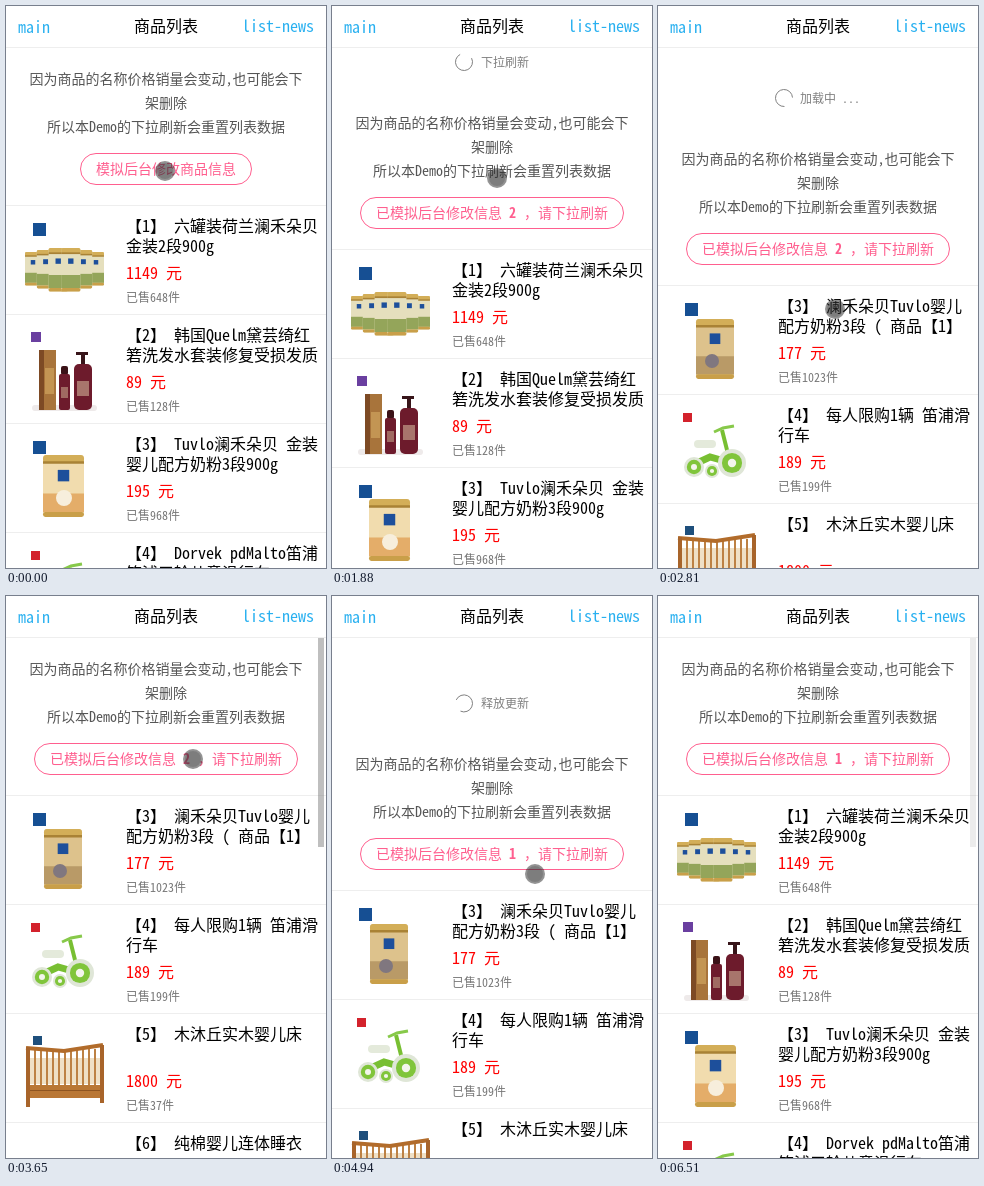
An HTML page with a canvas that plays this animation: 320 by 562 pixels, repeating every 6610 ms.

```html
<!DOCTYPE html>
<html lang="zh-CN">
<head>
<meta charset="utf-8">
<title>商品列表</title>
<style>
  html, body { margin: 0; width: 100%; height: 100%; overflow: hidden; background: #fff; }
  canvas { display: block; width: 320px; height: 562px; }
</style>
</head>
<body>
<canvas id="stage" width="320" height="562"></canvas>
<script>
const ctx = document.getElementById('stage').getContext('2d');
const LOOP = 6610, WIDTH = 320, HEIGHT = 562, ROW = 109, REFRESH = 80;
const FAMILY = '"Noto Sans Mono CJK SC", "Noto Sans CJK SC", "Noto Sans CJK", monospace';

// The screen repaints only at these moments.
const MOMENTS = [0, 1240, 1360, 1480, 1630, 1760, 1880, 2030, 2150, 2270, 2420, 2540,
  2690, 2810, 2960, 3110, 3230, 3380, 3510, 3650, 3770, 3890, 4010, 4160, 4280, 4430,
  4580, 4700, 4820, 4940, 5090, 5240, 5360, 5510, 5660, 5780, 5930, 6360, 6510];

// Finger track: time, x, y
const TRACK = [[0, 159, 165], [1239, 159, 165], [1240, 160, 163], [1480, 163, 124],
  [1630, 164, 131], [1760, 164, 146], [1880, 165, 172], [2030, 167, 222],
  [2270, 169, 318], [2540, 173, 318], [2810, 177, 303], [3230, 184, 204],
  [3510, 188, 171], [3650, 187, 163], [3890, 187, 161], [4010, 186, 143],
  [4160, 186, 101], [4430, 187, 129], [4580, 188, 181], [4700, 191, 206],
  [4940, 203, 278], [5090, 226, 400], [5240, 244, 490], [5510, 252, 517],
  [5660, 258, 548], [5780, 262, 590]];

// Each pull: first touch, finger start, release, collapse
const PULLS = [
  { from: 1600, startY: 128, release: 2290, collapse: 2935 },
  { from: 4400, startY: 121, release: 5095, collapse: 5635 }
];
const SETTLE = 300;

const STOCK = [
  { title: ['【1】 六罐装荷兰澜禾朵贝', '金装2段900g'], price: 1149, sold: 648, art: sixTins },
  { title: ['【2】 韩国Quelm黛芸绮红', '箬洗发水套装修复受损发质'], price: 89, sold: 128, art: shampoo },
  { title: ['【3】 Tuvlo澜禾朵贝 金装', '婴儿配方奶粉3段900g'], price: 195, sold: 968, art: creamTin },
  { title: ['【4】 Dorvek pdMalto笛浦', '笛浦三轮儿童滑行车'], price: 389, sold: 85, art: trike }
];
const UPDATED = [
  { title: ['【3】 澜禾朵贝Tuvlo婴儿', '配方奶粉3段 ( 商品【1】'], price: 177, sold: 1023, art: goldTin },
  { title: ['【4】 每人限购1辆 笛浦滑', '行车'], price: 189, sold: 199, art: trike },
  { title: ['【5】 木沐丘实木婴儿床'], price: 1800, sold: 37, art: crib },
  { title: ['【6】 纯棉婴儿连体睡衣'], price: 69, sold: 240, art: () => {} }
];

const clamp = v => Math.max(0, Math.min(1, v));

// CSS "ease": cubic-bezier(.25, .1, .25, 1)
function ease(x) {
  if (x <= 0 || x >= 1) return clamp(x);
  const bezier = (s, a, b) => 3 * a * s * (1 - s) ** 2 + 3 * b * s * s * (1 - s) + s ** 3;
  let low = 0, high = 1;
  for (let i = 0; i < 16; i++) {
    const mid = (low + high) / 2;
    if (bezier(mid, 0.25, 0.25) < x) low = mid; else high = mid;
  }
  return bezier(low, 0.1, 1);
}

function fingerAt(t) {
  const next = TRACK.findIndex(key => key[0] > t);
  if (next < 0) return null;
  const [t0, x0, y0] = TRACK[next - 1], [t1, x1, y1] = TRACK[next];
  const k = (t - t0) / (t1 - t0);
  return { x: x0 + (x1 - x0) * k, y: y0 + (y1 - y0) * k };
}

// Beyond the refresh height the list follows the finger at a fifth of its speed.
function dragHeight(t, startY) {
  const dy = Math.max(0, fingerAt(t).y - startY);
  return dy < REFRESH ? dy : REFRESH + (dy - REFRESH) * 0.2;
}

function pullAt(t) {
  const pull = PULLS.find(p => t >= p.from && t < p.collapse + SETTLE);
  if (!pull) return { height: 0 };
  if (t < pull.release) {
    const height = dragHeight(t, pull.startY);
    return { height, label: height < REFRESH ? '下拉刷新' : '释放更新', turn: height / REFRESH };
  }
  const top = dragHeight(pull.release, pull.startY);
  const height = t < pull.collapse
    ? top + (REFRESH - top) * ease((t - pull.release) / SETTLE)
    : REFRESH * (1 - ease((t - pull.collapse) / SETTLE));
  return { height, label: '加载中 ...', loading: true, turn: (t - pull.release) / 600 };
}

function text(str, x, y, size, color, align = 'left', weight = 400) {
  ctx.font = `${weight} ${size}px ${FAMILY}`;
  ctx.fillStyle = color;
  ctx.textAlign = align;
  ctx.fillText(str, x, Math.round(y + size * 0.38));
}

function rect(x, y, w, h, color, radius = 0) {
  ctx.fillStyle = color;
  ctx.beginPath();
  ctx.roundRect(x, y, w, h, radius);
  ctx.fill();
}

function disc(x, y, r, color) {
  ctx.fillStyle = color;
  ctx.beginPath();
  ctx.arc(x, y, r, 0, 7);
  ctx.fill();
}

function line(points, color, width) {
  ctx.strokeStyle = color;
  ctx.lineWidth = width;
  ctx.beginPath();
  points.forEach(([x, y]) => ctx.lineTo(x, y));
  ctx.stroke();
}

function tin(x, y, w, h, body, base) {
  rect(x, y, w, h, body, w / 10);
  rect(x, y, w, h * 0.13, '#d3ae58', w / 12);
  rect(x, y + h * 0.1, w, h * 0.04, '#a98235');
  rect(x + w * 0.36, y + h * 0.24, w * 0.28, w * 0.28, '#1d4f9b');
  rect(x, y + h * 0.62, w, h * 0.3, base);
  rect(x, y + h * 0.92, w, h * 0.08, '#c99f49', w / 12);
}

function sixTins() {
  rect(27, 18, 13, 13, '#164f93');
  for (const i of [0, 5, 1, 4, 2, 3]) {
    const d = Math.abs(i - 2.5), w = 20 - d * 1.6;
    tin(58.5 + (i - 2.5) * 12.6 - w / 2, 42 + d * 2, w, 46 - d * 5, '#e5dfbd', '#94a55a');
  }
}

function shampoo() {
  rect(25, 18, 10, 10, '#6a3fa0');
  rect(26, 91, 65, 6, '#eeeaea', 3);
  rect(33, 36, 17, 60, '#a8743b');
  rect(33, 36, 5, 60, '#7d4a24');
  rect(39, 54, 9, 26, '#c39553');
  rect(55, 52, 7, 9, '#3b1218', 2);
  rect(53, 60, 11, 36, '#6d1b2c', 2);
  rect(55, 73, 7, 11, '#a06a62');
  rect(70, 38, 12, 3, '#38151a');
  rect(75, 38, 4, 14, '#38151a');
  rect(68, 50, 18, 46, '#6d1b2c', 5);
  rect(71, 67, 12, 15, '#a8756c');
}

function creamTin() {
  rect(27, 18, 13, 13, '#164f93');
  tin(37, 32, 41, 62, '#f1dcae', '#e4ad69');
  disc(58, 75, 8, '#f7eedc');
}

function goldTin() {
  rect(27, 18, 13, 13, '#164f93');
  tin(38, 34, 38, 60, '#ddc28c', '#b99a67');
  disc(54, 76, 7, '#80777f');
}

function trike() {
  rect(25, 19, 9, 9, '#d3222c');
  line([[39, 69], [52, 63], [70, 68]], '#78bf32', 7);
  line([[64, 36], [72, 68]], '#78bf32', 4);
  line([[56, 38], [65, 34], [76, 32]], '#87c94a', 3);
  rect(36, 46, 22, 8, '#e4eadb', 4);
  for (const [x, y, r] of [[36, 73, 10], [54, 77, 7], [74, 69, 14]]) {
    disc(x, y, r, '#dfe6d7');
    disc(x, y, r * 0.72, '#80c53b');
    disc(x, y, r * 0.3, '#f3f5ed');
  }
}

function crib() {
  rect(27, 23, 9, 9, '#1e4f7c');
  rect(23, 45, 73, 26, '#efe0c6');
  for (let x = 22; x < 97; x += 6) rect(x, 36, 2, 38, '#bd8144');
  line([[20, 35], [58, 38], [97, 32]], '#b26c2b', 4);
  rect(20, 72, 78, 13, '#b97735');
  rect(20, 77, 78, 1, '#8e5420');
  rect(20, 34, 4, 60, '#a8642a');
  rect(94, 32, 4, 58, '#a8642a');
}

function drawRow(item, y) {
  ctx.save();
  ctx.translate(0, y);
  rect(0, 0, WIDTH, 1, '#eee');
  item.art();
  item.title.forEach((part, i) => text(part, 120, 21 + i * 20, 16, '#000'));
  text(`${item.price} 元`, 120, 68, 16, '#f00');
  text(`已售${item.sold}件`, 120, 92, 12, '#777');
  ctx.restore();
}

function drawButton(t) {
  const count = t < 1240 ? 0 : t < 3770 ? 2 : 1;
  const pressed = t >= 1240 && t < 1360 || t >= 3770 && t < 3890;
  const pink = '#ff5f8f', x = count ? 28 : 74;
  ctx.save();
  if (pressed) ctx.globalAlpha = 0.5;
  ctx.strokeStyle = pink;
  ctx.lineWidth = 1;
  ctx.beginPath();
  ctx.roundRect(x + 0.5, 147.5, WIDTH - 2 * x - 1, 31, 15.5);
  ctx.stroke();
  if (count) {
    text('已模拟后台修改信息', 44, 163, 14, pink);
    text(count, 177, 163, 14, pink, 'left', 700);
    text('，请下拉刷新', 276, 163, 14, pink, 'right');
  } else {
    text('模拟后台修改商品信息', 160, 163, 14, pink, 'center');
  }
  ctx.restore();
}

function drawHint({ height, label, loading, turn }) {
  const y = height + 12;
  ctx.strokeStyle = '#808080';
  ctx.lineWidth = 1;
  ctx.beginPath();
  const start = (0.75 + 2 * turn) * Math.PI;
  ctx.arc(loading ? 126 : 132, y, 8.5, start, start + 1.5 * Math.PI);
  ctx.stroke();
  text(label, loading ? 142 : 149, y, 12, '#808080');
}

function drawHeader() {
  rect(0, 0, WIDTH, 41, '#fff');
  rect(0, 41, WIDTH, 1, '#eee');
  text('main', 12, 21, 16, '#28b0f0');
  text('商品列表', 160, 20, 16, '#000', 'center');
  text('list-news', 308, 20, 16, '#28b0f0', 'right');
}

function drawScrollbar(t) {
  const fade = (shown, start) => t < shown ? 0 : 1 - clamp((t - start) / 300);
  const alpha = Math.max(fade(5660, 6300), t < 5000 ? fade(3650, 3700) : 0);
  if (alpha) rect(312, 42, 6, 209, `rgba(128,128,128,${alpha * 0.5})`);
}

function draw(t) {
  const pull = pullAt(t);
  const items = t >= 2800 && t < PULLS[1].collapse ? UPDATED : STOCK;
  rect(0, 0, WIDTH, HEIGHT, '#fff');
  ctx.save();
  ctx.translate(0, Math.round(pull.height));
  text('因为商品的名称价格销量会变动,也可能会下', 160, 73, 14, '#555', 'center');
  text('架删除', 160, 97, 14, '#555', 'center');
  text('所以本Demo的下拉刷新会重置列表数据', 160, 121, 14, '#555', 'center');
  drawButton(t);
  items.forEach((item, i) => drawRow(item, 199 + i * ROW));
  ctx.restore();
  if (pull.label) drawHint(pull);
  drawHeader();
  drawScrollbar(t);
  const finger = fingerAt(t);
  if (finger) {
    disc(finger.x, finger.y, 10, 'rgba(40,40,40,.5)');
    disc(finger.x, finger.y, 8, 'rgba(40,40,40,.2)');
  }
}

function frame() {
  const t = performance.now() % LOOP;
  draw(MOMENTS.findLast(moment => moment <= t));
  requestAnimationFrame(frame);
}
frame();
</script>
</body>
</html>
```
